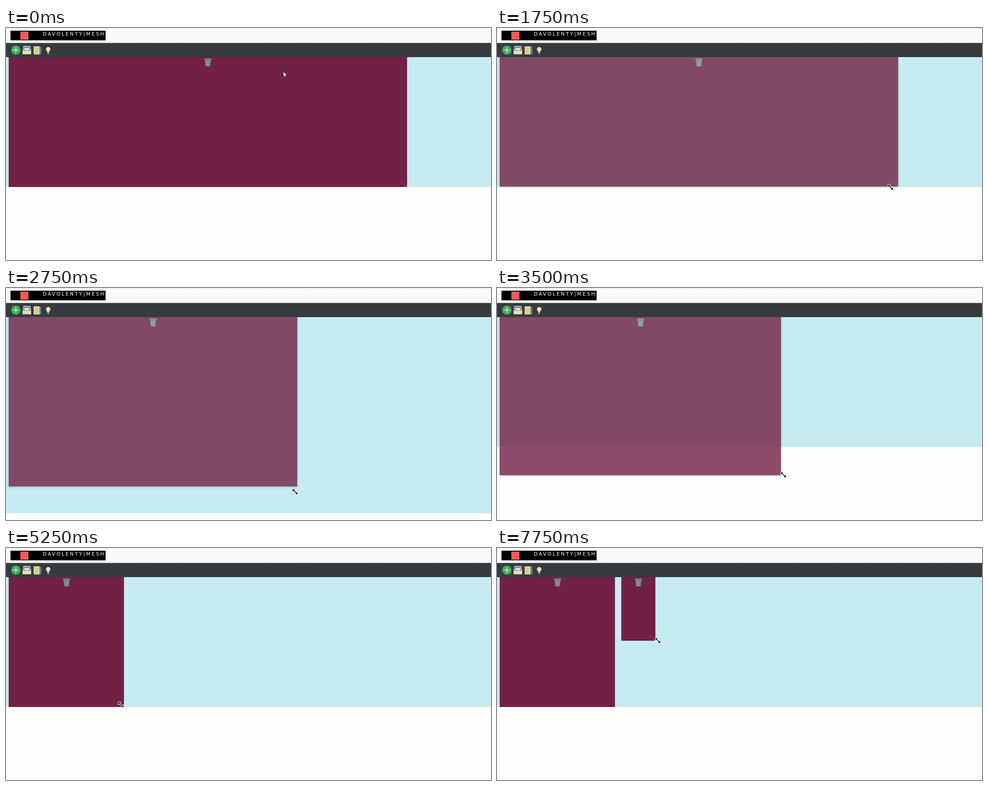
Write an HTML page that moves like this. It is 1081 px wide and 518 px high and loops after 8000 ms.

```html
<!DOCTYPE html>
<html lang="en">
<head>
<meta charset="utf-8">
<title>Resizable tiles</title>
<style>
  html, body { margin: 0; width: 100%; height: 100%; overflow: hidden; background: #fdfdfd; }
  #stage { position: relative; width: 1081px; height: 518px; overflow: hidden; }
  #board, .tile, svg { position: absolute; }
  #board { left: 0; top: 65px; width: 1081px; background: #c6ebf0; }
  .tile { top: 65px; background: #722145; box-shadow: inset 0 -2px #6b1d40; }
  .tile.dragged { opacity: .8; box-shadow: 0 1px 4px rgba(0, 0, 0, .35); }
  .bin { left: 50%; top: 2px; margin-left: -9px; }
  .grip { right: 1px; bottom: 1px; }
  .dragged .grip { opacity: .4; }
  #top, #pointer { left: 0; top: 0; }
</style>
</head>
<body>
<div id="stage">
  <div id="board"></div>
  <div class="tile" id="main"></div>
  <div class="tile" id="added"></div>

  <svg id="top" width="1081" height="65">
    <defs>
      <pattern id="grain" width="11" height="9" patternUnits="userSpaceOnUse">
        <path d="M1 2h2M6 1h1M9 4h2M4 6h2M8 8h1M1 7h1" stroke="#eef3f2"/>
      </pattern>
    </defs>
    <rect width="1081" height="34" fill="#f9fbfb"/>
    <rect width="1081" height="34" fill="url(#grain)"/>
    <rect width="1081" height="1" fill="#e4e6e6"/>
    <rect x="10" y="6" width="212" height="21.500"/>
    <rect x="32" y="8" width="18" height="18" fill="#fa5a55"/>
    <text x="82" y="16.500" fill="#fff" font-family="'DejaVu Sans', sans-serif" font-size="11" letter-spacing="2.7">DAVOLENTY|MESH</text>

    <rect y="33.400" width="1081" height="32" fill="#363b40"/>
    <circle cx="22" cy="49.300" r="10.400" fill="#3fae5a"/>
    <path d="M16 49.300h12M22 43.300v12" stroke="#fff" stroke-width="1.300"/>

    <g id="tray">
      <path d="M39 40h15l2 11v8H37v-8z" fill="#d5dbe0"/>
      <path d="M40 41.500h13l1.500 9h-16z" fill="#6f7d88"/>
      <path d="M41 44.500h11v5H41z" fill="#dfe6ea"/>
      <path d="M37 51h5l2 3h5l2-3h5v8H37z" fill="#eadfae"/>
      <path d="M37 58.500h19" stroke="#b7a874"/>
    </g>
    <g id="notes">
      <path d="M62 41h13v18H62z" fill="#f0e3a8"/>
      <path d="M64 44.500h9M64 47.500h9M64 50.500h9M64 53.500h9M64 56.500h9" stroke="#a89a60"/>
      <path d="M62 41v18" stroke="#c6b26b" stroke-width="2" stroke-dasharray="1.500 1"/>
      <path d="M77.500 42v15" stroke="#58aebc" stroke-width="2"/>
      <path d="M76.500 57h2l-1 2z" fill="#e8dfc4"/>
    </g>
    <g id="bulb">
      <path d="M92 54c0-3-3-3-3-6.500a5 5 0 0 1 10 0c0 3.500-3 3.500-3 6.500z" fill="#f3dfa4"/>
      <path d="M92 46q2-3 3 0" fill="none" stroke="#fffbe8" stroke-width="2"/>
      <path d="M92 54h4v3l-1 1.500h-2l-1-1.500z" fill="#8e999f"/>
    </g>
  </svg>

  <svg id="pointer" width="1081" height="518" stroke-linejoin="round">
    <path id="arrow" d="M0 0V12L2.800 9.500 4.600 13.500 6.700 12.600 4.900 8.700H8.500Z" fill="#fff" stroke="#111"/>
    <path id="sizer" d="M-5.500-5.500H-.5L-2.400-3.600 3.600 2.400 5.500 .5V5.500H.5L2.400 3.600-3.600-2.400-5.500-.5Z"
      fill="#111" stroke="#fff" stroke-width="2" paint-order="stroke"/>
  </svg>
</div>

<script>
const LOOP = 8000, STEP = 250, TOP = 65, LEFT = 6, LAG = 90;
const REST = 355, GROWN = 503;
const el = id => document.getElementById(id);
const linear = p => p;
const easeOut = p => 1 - (1 - p) ** 2;

// Pointer path: time, x, y, easing towards that point
const path = [
  [250, 618, 97],
  [1400, 896.5, 353, easeOut],
  [1700, 896.5, 353],
  [2250, 684.5, 384.5],
  [3000, 624, 490],
  [3250, 631, 418],
  [3750, 646, 416],
  [5000, 257, 376, easeOut],
  [5250, 256, 350],
  [5750, 158, 210],
  [6500, 22, 48],
  [6750, 22, 48],
  [7600, 358.5, 206.5, easeOut]
];

function pointerAt(t) {
  const next = path.findIndex(key => key[0] > t);
  if (next === 0) return path[0].slice(1, 3);
  if (next < 0) return path[path.length - 1].slice(1, 3);
  const [t0, x0, y0] = path[next - 1];
  const [t1, x1, y1, ease = linear] = path[next];
  const p = ease((t - t0) / (t1 - t0));
  return [x0 + (x1 - x0) * p, y0 + (y1 - y0) * p];
}

// While dragged, the tile's corner trails the pointer by LAG.
function cornerAt(t) {
  if (t >= 5250) return [263, REST];
  if (t <= 1500) return [894, REST];
  const [x, y] = pointerAt(t - LAG);
  return [x - 2.5, y + .5];
}

for (const tile of document.querySelectorAll('.tile')) {
  tile.innerHTML = `
    <svg class="bin" width="18" height="20">
      <path d="M2 4h14l-2 15H4z" fill="#64757d"/>
      <path d="M4.500 5l1.200 13M7.500 5l.6 13M10.500 5l-.6 13M13.500 5l-1.200 13" stroke="#a5b3b8"/>
      <path d="M1 2.500h16" stroke="#93a3a9" stroke-width="2"/>
    </svg>
    <svg class="grip" width="12" height="12" fill="none" stroke="#6f5a60">
      <path d="M1.500 1.500l9 9M1 5V1h4M7 11h4V7"/>
    </svg>`;
}

function placeTile(tile, left, [right, bottom], [x, y], dragged) {
  const near = x > left && x < right + 6 && y > TOP && y < bottom + 6;
  tile.style.left = left + 'px';
  tile.style.width = Math.round(right) - left + 'px';
  tile.style.height = Math.round(bottom) - TOP + 'px';
  tile.classList.toggle('dragged', dragged);
  tile.querySelector('.grip').style.display = near || dragged ? '' : 'none';
}

function draw(t) {
  const dragged = t > 1500 && t < 5250;
  const sizing = t >= 1250 && t <= 5250 || t >= 7500;
  const pointer = pointerAt(t), corner = cornerAt(t);

  el('board').style.height = (corner[1] > 430 ? GROWN : REST) - TOP + 'px';
  placeTile(el('main'), LEFT, corner, pointer, dragged);
  placeTile(el('added'), 277, [353, 206.5], pointer, false);
  el('added').style.display = t >= 7000 ? '' : 'none';

  for (const [id, shown] of [['arrow', !sizing], ['sizer', sizing]]) {
    el(id).style.display = shown ? '' : 'none';
    el(id).setAttribute('transform', `translate(${pointer})`);
  }
}

const start = performance.now();
function tick() {
  const t = (performance.now() - start) % LOOP;
  draw(Math.floor(t / STEP) * STEP);
  requestAnimationFrame(tick);
}
tick();
</script>
</body>
</html>
```
